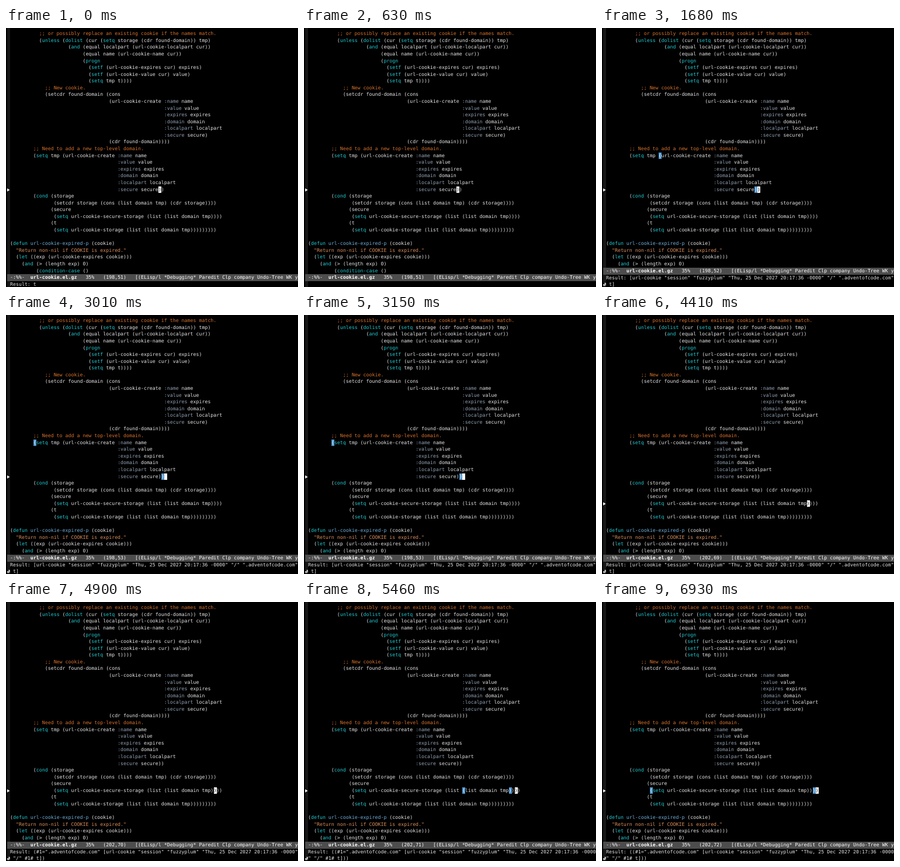
Write an HTML page that moves like this. It is 500 px wide and 443 px high and loops after 7 s.

```html
<!DOCTYPE html>
<html lang="en">
<head>
<meta charset="utf-8">
<title>Stepping through Lisp</title>
<style>
  html, body { margin: 0; width: 100%; height: 100%; overflow: hidden; background: #000; }
  #stage {
    position: relative; width: 500px; height: 443px; overflow: hidden;
    background: #000; color: #e6e6e6;
    font: 8.27px/11.58px "DejaVu Sans Mono", "Noto Sans Mono", monospace;
    text-rendering: geometricPrecision; font-variant-ligatures: none;
  }
  #stage div { position: absolute; white-space: pre; height: 11.58px; }
  #stage #fringe { left: 2px; top: 0; width: 5px; height: 443px; background: #171717; }
  #stage #mode { left: 2px; width: 493px; height: 12px; padding-left: 5px; background: #4d4d4d; color: #fff; }
  .k { color: #1fcbd2; }
  .c { color: #d8722c; }
  .s { color: #dc8f5c; }
  .a { color: #93a3b5; }
  .f { color: #70b0dc; }
  .cell { width: 4.98px; }
  .pair { background: #4f94cd; color: #fff; }
  .cursor { background: #fff; color: #000; }
  svg { position: absolute; left: 1px; width: 6px; height: 8px; fill: #fff; }
</style>
</head>
<body>
<div id="stage"><div id="fringe"></div></div>
<script>
const LOOP = 7000, CW = 4.98, LH = 11.58, LEFT = 7, TOP = 4.2, BAR = 12, WRAP = 99, FIRST = 175;

// Each entry: indent column, then the text of the line.
const code = [
  [10, ';; or possibly replace an existing cookie if the names match.'],
  [10, '(unless (dolist (cur (setq storage (cdr found-domain)) tmp)'],
  [20, '(and (equal localpart (url-cookie-localpart cur))'],
  [25, '(equal name (url-cookie-name cur))'],
  [25, '(progn'],
  [27, '(setf (url-cookie-expires cur) expires)'],
  [27, '(setf (url-cookie-value cur) value)'],
  [27, '(setq tmp t))))'],
  [12, ';; New cookie.'],
  [12, '(setcdr found-domain (cons'],
  [34, '(url-cookie-create :name name'],
  [53, ':value value'],
  [53, ':expires expires'],
  [53, ':domain domain'],
  [53, ':localpart localpart'],
  [53, ':secure secure)'],
  [34, '(cdr found-domain))))'],
  [8, ';; Need to add a new top-level domain.'],
  [8, '(setq tmp (url-cookie-create :name name'],
  [37, ':value value'],
  [37, ':expires expires'],
  [37, ':domain domain'],
  [37, ':localpart localpart'],
  [37, ':secure secure))'],
  [8, '(cond (storage'],
  [15, '(setcdr storage (cons (list domain tmp) (cdr storage))))'],
  [14, '(secure'],
  [15, '(setq url-cookie-secure-storage (list (list domain tmp))))'],
  [14, '(t'],
  [15, '(setq url-cookie-storage (list (list domain tmp)))))))))'],
  [0, ''],
  [0, '(defun url-cookie-expired-p (cookie)'],
  [2, '"Return non-nil if COOKIE is expired."'],
  [2, '(let ((exp (url-cookie-expires cookie)))'],
  [4, '(and (> (length exp) 0)'],
  [9, '(condition-case ()']
].map(([indent, text]) => ' '.repeat(indent) + text);

const site = '".adventofcode.com"';
const cookie = '[url-cookie "session" "fuzzyplum" "Thu, 25 Dec 2027 20:17:36 -0000" "/" ';
const vector = `${cookie}${site} t]`;
const entry = `(#1=${site} ${cookie}#1# t])`;

// Each step changes some fields; pair holds row and column of matching parens.
let state = {};
const steps = [
  [0, { line: 198, col: 51, on: true, pair: [], echo: 't' }],
  [490, { on: false }],
  [630, { on: true, echo: '' }],
  [700, { col: 52, echo: vector }],
  [840, { pair: [[18, 18], [23, 51]] }],
  [1190, { on: false }],
  [1680, { on: true }],
  [2170, { on: false }],
  [2730, { on: true }],
  [2800, { echo: '' }],
  [2870, { col: 53, echo: vector }],
  [3010, { pair: [[18, 8], [23, 52]] }],
  [3430, { on: false }],
  [3780, { line: 202, col: 65, on: true, pair: [], echo: site }],
  [4200, { col: 69, echo: vector }],
  [4690, { on: false }],
  [4830, { on: true, echo: '' }],
  [4900, { col: 70, echo: entry }],
  [5040, { pair: [[27, 53], [27, 69]] }],
  [5390, { col: 71, echo: `(${entry})` }],
  [5530, { pair: [[27, 47], [27, 70]] }],
  [5950, { on: false }],
  [6510, { on: true }],
  [6720, { echo: '' }],
  [6790, { col: 72, echo: `(${entry})` }],
  [6930, { pair: [[27, 15], [27, 71]] }]
].map(([time, change]) => ({ time, ...(state = { ...state, ...change }) }));

const stage = document.getElementById('stage');
const rowTop = row => TOP + row * LH;
const echoTop = rowTop(36) + BAR;

function add(cls = '') {
  const el = document.createElement('div');
  el.className = cls;
  return stage.appendChild(el);
}

function place(el, top, col = 0) {
  el.style.top = top + 'px';
  el.style.left = LEFT + col * CW + 'px';
}

function addIcon(shape) {
  stage.insertAdjacentHTML('beforeend', `<svg viewBox="0 0 6 8">${shape}</svg>`);
  return stage.lastElementChild;
}

const rules = /(?<c>;;.*)|(?<s>".*")|(?<a>:[a-z]+)|(?<k>(?<=\()(?:unless|dolist|setq|setf|and|progn|cond|defun|let|condition-case)(?![\w-]))|(?<f>(?<=defun )\S+)/g;

function paint(text) {
  return text.replace(rules, (word, ...rest) => {
    const groups = rest[rest.length - 1];
    const cls = Object.keys(groups).find(name => groups[name]);
    return `<span class="${cls}">${word}</span>`;
  });
}

const rows = code.map((text, row) => {
  const el = add();
  el.innerHTML = paint(text);
  place(el, rowTop(row));
  return el;
});
const pairs = [add('cell pair'), add('cell pair')];
const cursor = add('cell cursor');
const mode = add();
mode.id = 'mode';
mode.innerHTML = '-:%%-  <b>url-cookie.el.gz</b>   35%   (<span></span>)   ' +
  '[(ELisp/l *Debugging* Paredit Clp company Undo-Tree WK y';
const spot = mode.querySelector('span');
const echo = [add(), add()];
const arrow = addIcon('<path d="M1 1.2L5.4 4L1 6.8Z"/>');
const wrap = addIcon('<path d="M.6 4.6L3.2 2.4V6.8ZM3 4H4.4V2.2H3.4V1H5.6V5.2H3Z"/>');
wrap.style.top = echoTop + 2 + 'px';

function putCell(el, row, col) {
  place(el, rowTop(row), col);
  el.textContent = code[row][col] || ' ';
}

function show({ line, col, on, pair, echo: result }) {
  const row = line - FIRST;
  const text = result && 'Result: ' + result;
  const tall = text.length > WRAP;
  const firstTop = echoTop - (tall ? LH : 0);
  mode.style.top = firstTop - BAR + 'px';
  spot.textContent = `${line},${col}`;
  rows[35].hidden = tall;
  echo[0].textContent = text.slice(0, WRAP);
  echo[1].textContent = text.slice(WRAP);
  place(echo[0], firstTop);
  place(echo[1], echoTop);
  wrap.style.display = tall ? '' : 'none';
  arrow.style.top = rowTop(row) + 2 + 'px';
  pairs.forEach((el, i) => {
    el.hidden = !pair[i];
    if (pair[i]) putCell(el, ...pair[i]);
  });
  cursor.hidden = !on;
  putCell(cursor, row, col);
}

const start = performance.now();
let shown;

function tick() {
  const t = (performance.now() - start) % LOOP;
  const step = steps.findLast(s => s.time <= t) || steps[0];
  if (step !== shown) show(shown = step);
  requestAnimationFrame(tick);
}
tick();
</script>
</body>
</html>
```
